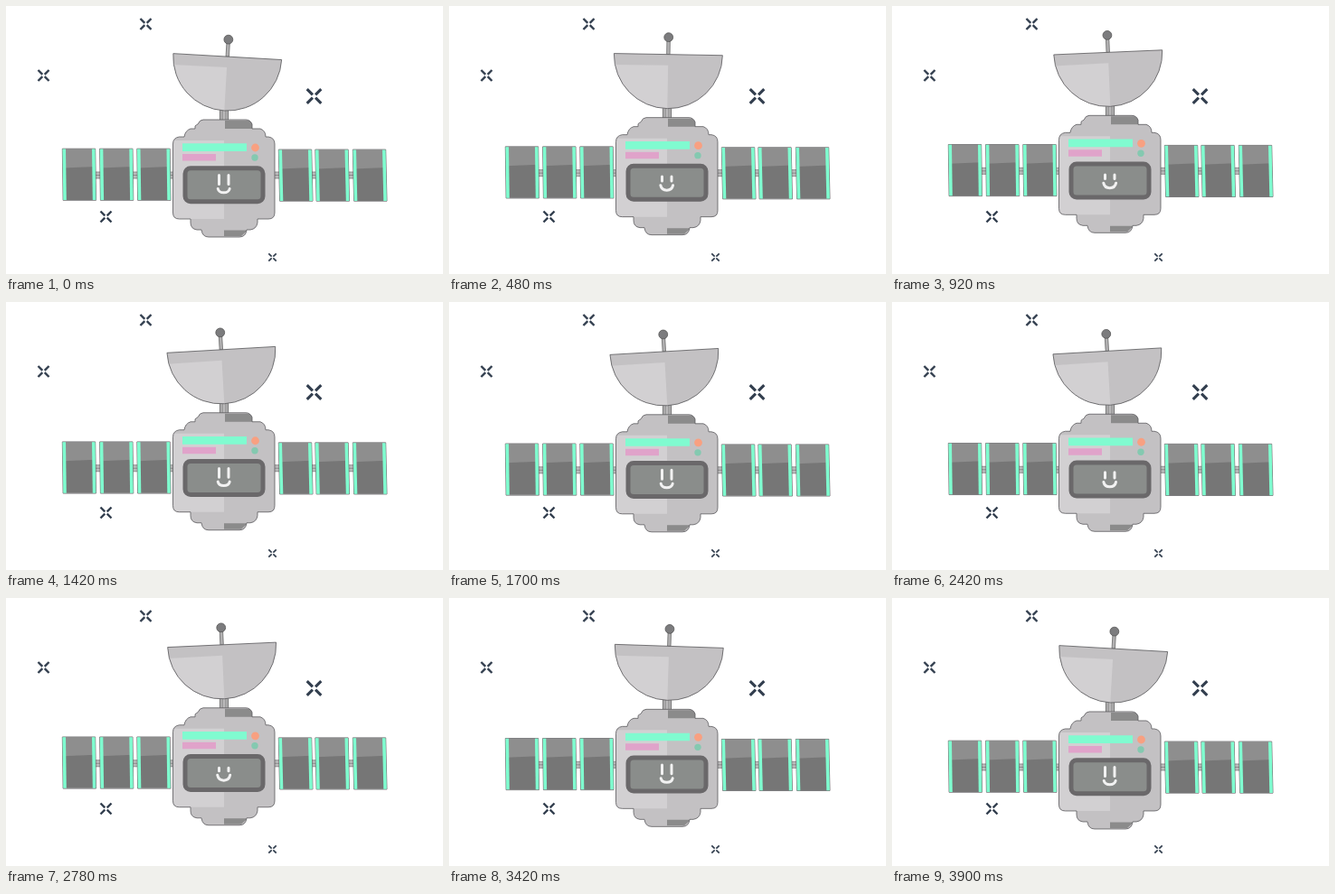
These frames come from a looping animation (483 px wide and 297 px high, 3.94 s). An HTML page:

```html
<!DOCTYPE html>
<html lang="en">
<head>
<meta charset="utf-8">
<title>Satellite</title>
<style>
html, body { margin: 0; width: 100%; height: 100%; overflow: hidden; background: #fff; }
svg { display: block; width: 483px; height: 297px; }
.edge { fill: none; stroke: #5a595c; stroke-width: .8; }
.light { fill: #d2d0d2; }
.mid { fill: #c3c1c3; }
.dark { fill: #8b8b8b; }
.star { fill: none; stroke: #333f4f; }
.face { fill: none; stroke: #f2f2f2; stroke-width: 3; stroke-linecap: round; stroke-linejoin: round; }
</style>
</head>
<body>
<svg viewBox="0 0 483 297">
  <defs>
    <path id="hull" d="M209 136V133Q210 132 212 131Q214 126 218 126H265Q270 126 272 131V136H281Q287 138 287 145H290Q297 146 297 153V229Q297 236 290 236H278V240Q277 247 270 248H266Q265 256 258 256H224Q217 256 216 248H211Q204 247 204 240V236H191.5Q184.5 236 184.5 229V153Q184.5 146 191.5 145H197Q198 138 204 136Z"/>
    <path id="bowl" d="M-60-60H60A60 60 0 0 1-60-60Z"/>
    <clipPath id="inHull"><use href="#hull"/></clipPath>
    <clipPath id="inBowl"><use href="#bowl"/></clipPath>
  </defs>
  <g id="stars"></g>
  <g id="craft">
    <g id="wings"></g>
    <path d="M236.5 114V127H245.5V114Z" fill="#b9b8b9" stroke="#666" stroke-width=".9"/>
    <path d="M239 114V127M243 114V127" stroke="#858585"/>
    <g id="dish">
      <path d="M-1.7-60V-76H1.7V-60Z" fill="#b2b1b2" stroke="#777" stroke-width=".9"/>
      <circle cy="-79" r="4.9" fill="#7c7c7e" stroke="#555" stroke-width=".8"/>
      <use href="#bowl" class="mid"/>
      <path class="light" clip-path="url(#inBowl)" d="M-60-47.5L0-48V0H-60Z"/>
      <use href="#bowl" class="edge"/>
    </g>
    <use href="#hull" class="mid"/>
    <g clip-path="url(#inHull)">
      <path class="light" d="M184 149H241V236H184Z"/>
      <path class="dark" d="M242 127H273V136H242ZM241 248.5H267L260 255H241Z"/>
    </g>
    <use href="#hull" class="edge"/>
    <path fill="#80fbd0" d="M195 152.3H266V161H195Z"/>
    <path fill="#e0a3ca" d="M195 164H232V171.5H195Z"/>
    <circle cx="275.5" cy="157" r="4.4" fill="#f8a081"/>
    <circle cx="275" cy="168" r="3.7" fill="#84c9b0"/>
    <rect x="198" y="179.7" width="86" height="37" rx="6" fill="#8a8d8b" stroke="#6a686a" stroke-width="5"/>
    <path id="face" class="face"/>
  </g>
</svg>
<script>
const $ = id => document.getElementById(id);

// x, y, radius of each twinkle
$('stars').innerHTML = [[154.5, 20, 6], [41.5, 77, 6], [340.5, 100, 7.8], [110.5, 233.5, 6], [294.5, 278.5, 4.2]]
  .map(([x, y, r]) => {
    const arms = [[1, 1], [1, -1], [-1, 1], [-1, -1]]
      .map(([a, b]) => `M${a * r * .2} ${b * r * .2}L${a * r} ${b * r}`).join('');
    return `<path class="star" transform="translate(${x} ${y})" stroke-width="${r * .4}" d="${arms}"/>`;
  }).join('');

const rod = (x, w) =>
  `<path d="M${x} 184h${w}v7h${-w}z" fill="#bcbbbc"/>
   <path d="M${x} 184h${w}M${x} 187.5h${w}M${x} 191h${w}" stroke="#858585" stroke-width=".9"/>`;

// solar panel leaning by s pixels from top to bottom
const panel = (x, y, s) => {
  const slab = (a, w, fill) => `<path d="M${a} 0h${w}l${s} 56.5h${-w}z" fill="${fill}"/>`;
  return `<g transform="translate(${x} ${y})">
    <path class="edge" d="M-.2-.3H36.2l${s} 57.1H${s - .2}z"/>${slab(0, 36, '#767676')}
    <path d="M0 0H36L${36 + s * .35} 19.5L${s * .37} 21Z" fill="#8e8e8e"/>
    ${slab(0, 3.5, '#7fffd0')}${slab(32.5, 3.5, '#7fffd0')}</g>`;
};

$('wings').innerHTML =
  [[98, 7], [139, 7], [180, 6], [296, 7], [336, 7], [377, 8]].map(a => rod(...a)).join('') +
  [62.5, 103.8, 145].map(x => panel(x, 158.5, .8)).join('') +
  [301.5, 342, 383.5].map(x => panel(x, 159.4, 1.3)).join('');

const ease = p => (1 - Math.cos(Math.PI * Math.min(1, Math.max(0, p)))) / 2;

function draw(now) {
  const t = now % 3940;
  // the motion rests briefly at the first high point
  const k = Math.floor((t < 960 ? t : Math.max(960, t - 100)) / 40);
  const lift = 4.7 * (1 - Math.cos(Math.PI * k / 24)) / 2;
  const tilt = 3.3 - 6.6 * (ease(k / 30) - ease((k - 60) / 33));
  const beat = k % 48;
  const smile = beat < 36 ? Math.sin(Math.PI * beat / 36) ** 2 : 0;

  $('craft').setAttribute('transform', `translate(0 ${-lift})`);
  $('dish').setAttribute('transform', `translate(241.3 116) rotate(${tilt})`);

  const top = 187.5 + 5 * smile, low = 197.5 - 1.5 * smile;
  const lip = 202.5 - 2 * smile, half = 6.5 + .5 * smile;
  $('face').setAttribute('d',
    `M235.5 ${top}V${low}M246 ${top}V${low}` +
    `M${240.7 - half} ${lip}C${240.2 - half * .7} 208.3 ${241.2 + half * .7} 208.3 ${240.7 + half} ${lip}`);
  requestAnimationFrame(draw);
}
draw(0);
</script>
</body>
</html>
```
